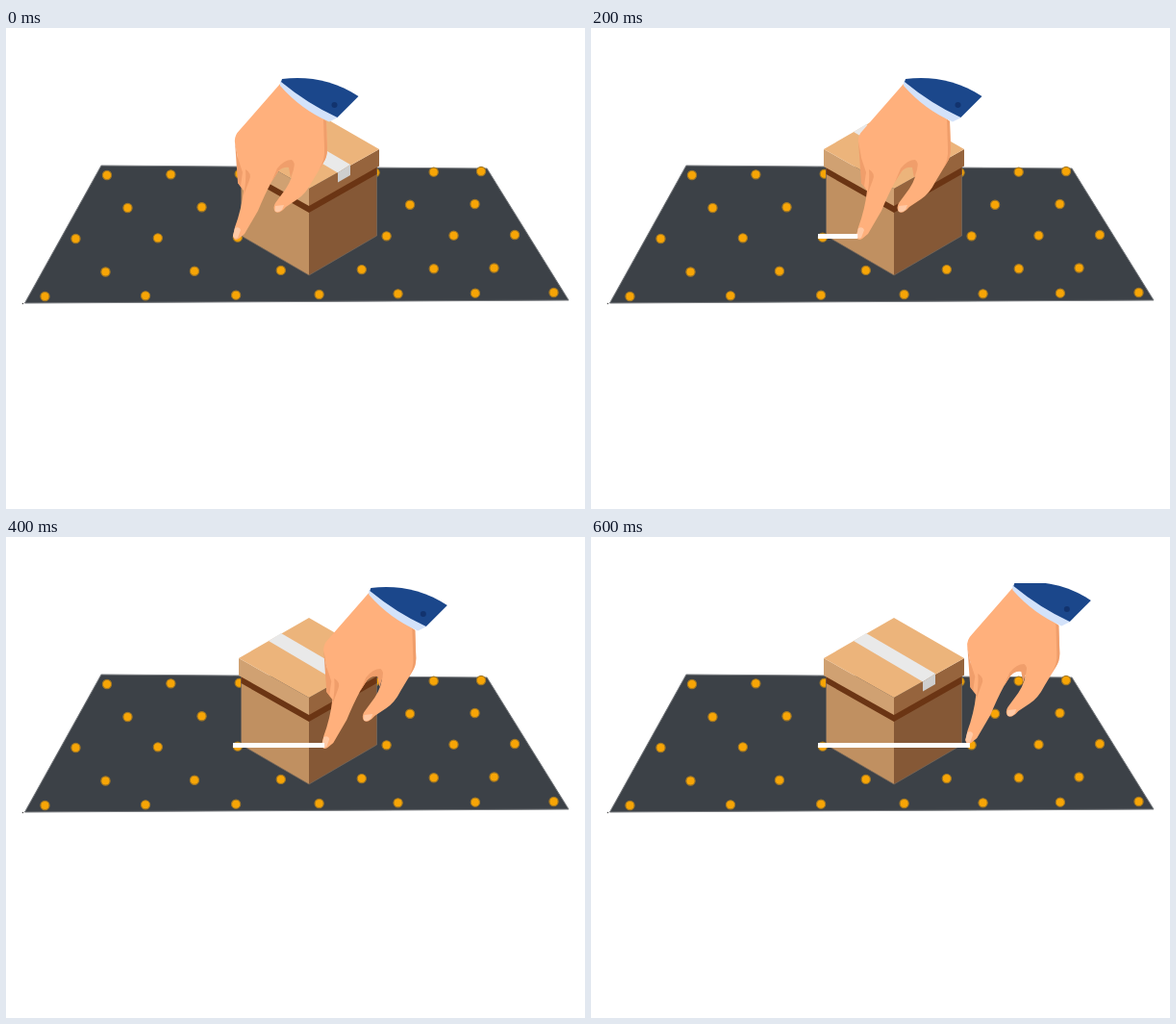
Recreate the animation shown at these times as an HTML page. Size 602 px wide and 500 px high, loop 700 ms.

```html
<!DOCTYPE html>
<html lang="en">
<head>
<meta charset="utf-8">
<title>Tracing behind the box</title>
<style>
  @property --x { syntax: "<length>"; inherits: true; initial-value: 0px; }
  @property --y { syntax: "<length>"; inherits: true; initial-value: 0px; }
  html, body { margin: 0; width: 100%; height: 100%; overflow: hidden; background: #fff; }
  svg { display: block; width: 602px; height: 500px; }

  /* One held position per 100 ms drives both the hand and its line */
  #stroke { animation: drag 700ms step-end infinite; }
  #hand { transform: translate(var(--x), var(--y)); }
  #trace { width: calc(var(--x) * 1.03); }
  @keyframes drag {
    0% { --x: 0px; --y: 0px; }
    14.2857% { --x: 22.7px; }
    28.5714% { --x: 40px; }
    42.8571% { --x: 65px; }
    57.1429% { --x: 92.3px; }
    71.4286% { --x: 120.3px; --y: 0px; }
    85.7143%, 100% { --x: 153.3px; --y: -5px; }
  }
  .shade { fill: #f09e6b; }
  .nail { fill: #ffc9a5; }
</style>
</head>
<body>
<svg viewBox="0 0 602 500">
  <clipPath id="stage"><rect y="48" width="602" height="452"/></clipPath>

  <path d="M99 143 500 146 585 283 19.500 286Z" fill="#3c4147" stroke="#777a7e"/>
  <circle cx="17.5" cy="286.5" r=".8" fill="#555"/>
  <g id="dots" fill="#f7a506" stroke="#a47822" stroke-width="1.2"></g>

  <g id="box">
    <path d="M244.5 145 315 185V257L244.5 216Z" fill="#c09061"/>
    <path d="M315 185 385.5 145V216L315 257Z" fill="#855836"/>
    <path d="M244.5 145V216L315 257 385.5 216V145" fill="none" stroke="#77675a" stroke-width=".8"/>
    <path d="M244.5 143 315 183 385.5 143V152L315 192 244.5 152Z" fill="#6b3514"/>
    <path d="M242 126 315 167V185L242 144Z" fill="#d0a172"/>
    <path d="M315 167 388 126V143.5L315 185Z" fill="#96643d"/>
    <path d="M315 84 388 126 315 167 242 126Z" fill="#ecb47b"/>
    <path d="M273 108 286 100 358 142 345 150.5Z" fill="#e9e9e9"/>
    <path d="M345 150.5 358 142V153L345 160.5Z" fill="#cecece"/>
  </g>

  <g id="stroke">
    <g clip-path="url(#stage)">
      <g id="hand">
        <path fill="#ffb07c" d="M285 58 243 106Q237 112 238 119L241 135 241 161 247 169Q245 188 238 207
          L236 216Q237 222 242 219L248 214 262 190Q269 173 276 160L283 149Q290 142 299 142
          Q299 155 291 167L280 182Q277 187 280 191 284 194 291 186L303 178Q312 172 318 160
          L330 140Q334 134 334 126L333 97Z"/>
        <path class="shade" d="M238 118 241 135 246 150 244 164 247 169 241 161Z"/>
        <path class="shade" d="M249 147Q256 151 253 158L247 174Q250 160 249 147Z"/>
        <path class="shade" d="M276 160 282 146Q289 137 297 137 301 139 299 147L296 156 294 145Q288 144 283 149Z"/>
        <path class="shade" d="M330 95 333 97 334 126Q334 134 330 140L325 148Q332 137 331 125Z"/>
        <path class="nail" d="M238 208Q243 206 244 210L241 218Q237 220 236 216Z"/>
        <path class="nail" d="M280 185 289 184 287 189Q282 193 279.500 190Z"/>
        <path fill="#d3e2fa" d="M285 55 345 93 336 97.5Q307 85 285 60Z"/>
        <path fill="#1b478b" d="M286 56 287 53C312 49.500 342 54 366.500 71L344.500 93Q314 79 286 56Z"/>
        <circle cx="341.5" cy="80" r="3" fill="#12336e"/>
      </g>
    </g>
    <rect id="trace" x="236" y="214" height="5" fill="#fff"/>
  </g>
</svg>
<script>
  const dots = document.getElementById("dots");
  const tilt = 4;

  function addDot(x, y) {
    const dot = document.createElementNS("http://www.w3.org/2000/svg", "circle");
    dot.setAttribute("cx", x);
    dot.setAttribute("cy", y);
    dot.setAttribute("r", 4.6);
    dots.append(dot);
  }

  // Spaces the dots of a row along a cubic from a to d
  function addRow(y, count, a, b, c, d) {
    for (let i = 0; i < count; i++) {
      const u = i / (count - 1), v = 1 - u;
      const x = a * v ** 3 + 3 * b * u * v * v + 3 * c * u * u * v + d * u ** 3;
      addDot(x, y - tilt * u);
    }
  }

  addRow(153, 7, 105, 230, 410, 494);
  addRow(187, 6, 126.5, 257, 377, 487.5);
  addRow(219, 7, 72.5, 245, 409, 529);
  addRow(253.5, 6, 103.5, 258, 415, 507.5);
  addRow(279, 7, 40.5, 262, 403, 569.5);
</script>
</body>
</html>
```
